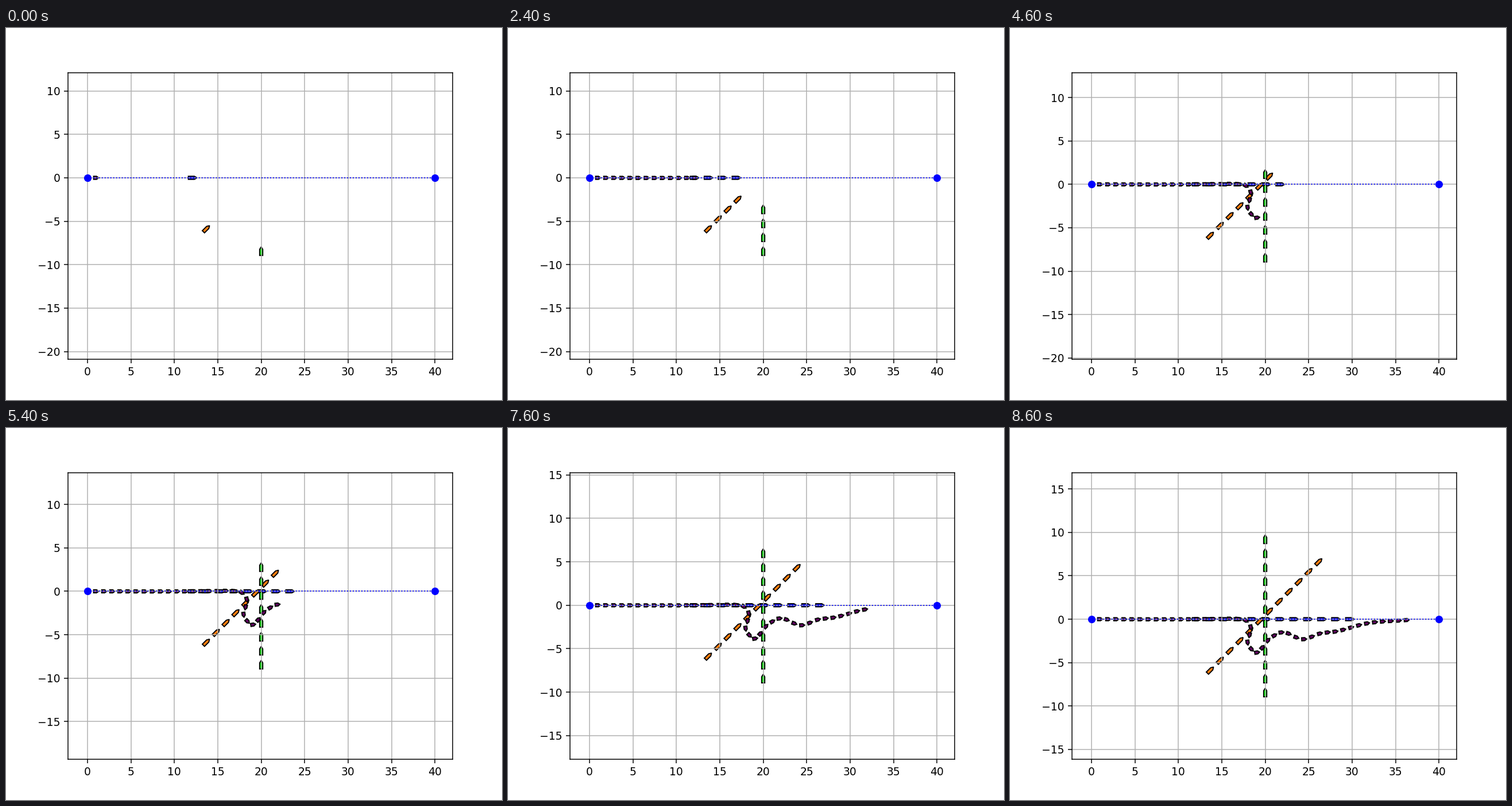
A matplotlib script that plays this animation: 864x648 px, repeating every 8.8 s.

```python
import numpy as np
import matplotlib.pyplot as plt
from matplotlib.animation import FuncAnimation
from matplotlib.patches import Polygon

FRAMES, INTERVAL = 44, 200
PERIOD = 4            # robot steps between two obstacle steps
STRIDE = 1.604        # distance covered by an obstacle per step
WIDTH = 0.36
LEFT, GOAL = -0.23, 40

# start x, start y, heading in degrees, fill
OBSTACLES = [
    (12.11, 0.0, 0, "blue"),
    (13.70, -5.86, 45, "tab:orange"),
    (20.0, -8.44, 90, "lime"),
]

# key points of the robot's route: step, x, y
ROUTE = np.array([
    (0, 0.06, 0), (13, 12.18, 0), (16, 14.98, .03), (18, 16.88, .02),
    (19, 17.79, -.17), (20, 18.34, -.95), (22, 17.98, -2.70), (24, 19.08, -3.83),
    (26, 20.33, -2.41), (28, 21.88, -1.52), (31, 24.49, -2.30),
    (33, 26.31, -1.65), (35, 28.09, -1.42), (39, 31.73, -.48), (44, 36.29, -.10),
])


def smooth(t, knots, values):
    """Cubic Hermite curve through the key points."""
    slopes = np.gradient(values, knots)
    i = np.clip(np.searchsorted(knots, t, side="right") - 1, 0, len(knots) - 2)
    h = knots[i + 1] - knots[i]
    u = (t - knots[i]) / h
    blend = u * u * (3 - 2 * u)
    return (values[i] * (1 - blend) + values[i + 1] * blend
            + h * u * (1 - u) * (slopes[i] * (1 - u) - slopes[i + 1] * u))


def arrow_box(x, y, angle, length, shoulder):
    """Pentagon centred on (x, y) with its nose pointing along angle."""
    back, front, half = -length / 2, length / 2, WIDTH / 2
    neck = back + shoulder * length
    pts = np.array([(back, -half), (neck, -half), (front, 0), (neck, half), (back, half)])
    c, s = np.cos(angle), np.sin(angle)
    return pts @ np.array([(c, s), (-s, c)]) + (x, y)


fig = plt.figure(figsize=(6.4, 4.8), dpi=135)
ax = fig.add_subplot()
ax.grid(True)
ax.plot([0, GOAL], [0, 0], "b:", lw=1)
ax.plot([0, GOAL], [0, 0], "bo")

margin = 0.05 * (GOAL - LEFT)
ax.set_xlim(LEFT - margin, GOAL + margin)
# equal scale on both axes
view_height = 22 * margin * (0.77 * 4.8) / (0.775 * 6.4)

shapes = []  # (first visible frame, patch)


def add_shape(born, points, color):
    patch = ax.add_patch(Polygon(points, closed=True, facecolor=color, edgecolor="black"))
    shapes.append((born, patch))


steps = np.arange(FRAMES + 1)
xs, ys = (smooth(steps, ROUTE[:, 0], ROUTE[:, k]) for k in (1, 2))
headings = np.arctan2(np.gradient(ys), np.gradient(xs))

for step in steps:
    add_shape(step - 1, arrow_box(xs[step], ys[step], headings[step], 0.58, 0.6), "#600060")
    if step % PERIOD == 0:
        moved = STRIDE * step / PERIOD
        for x0, y0, degrees, color in OBSTACLES:
            a = np.radians(degrees)
            box = arrow_box(x0 + moved * np.cos(a), y0 + moved * np.sin(a), a, 1.0, 0.7)
            add_shape(step - 1, box, color)


def update(n):
    for born, patch in shapes:
        patch.set_visible(born <= n)
    heights = np.concatenate([p.get_xy()[:, 1] for born, p in shapes if born <= n])
    middle = (heights.min() + heights.max()) / 2
    ax.set_ylim(middle - view_height / 2, middle + view_height / 2)
    return [patch for _, patch in shapes]


anim = FuncAnimation(fig, update, frames=FRAMES, interval=INTERVAL, repeat=True, repeat_delay=0)
plt.show()
```
